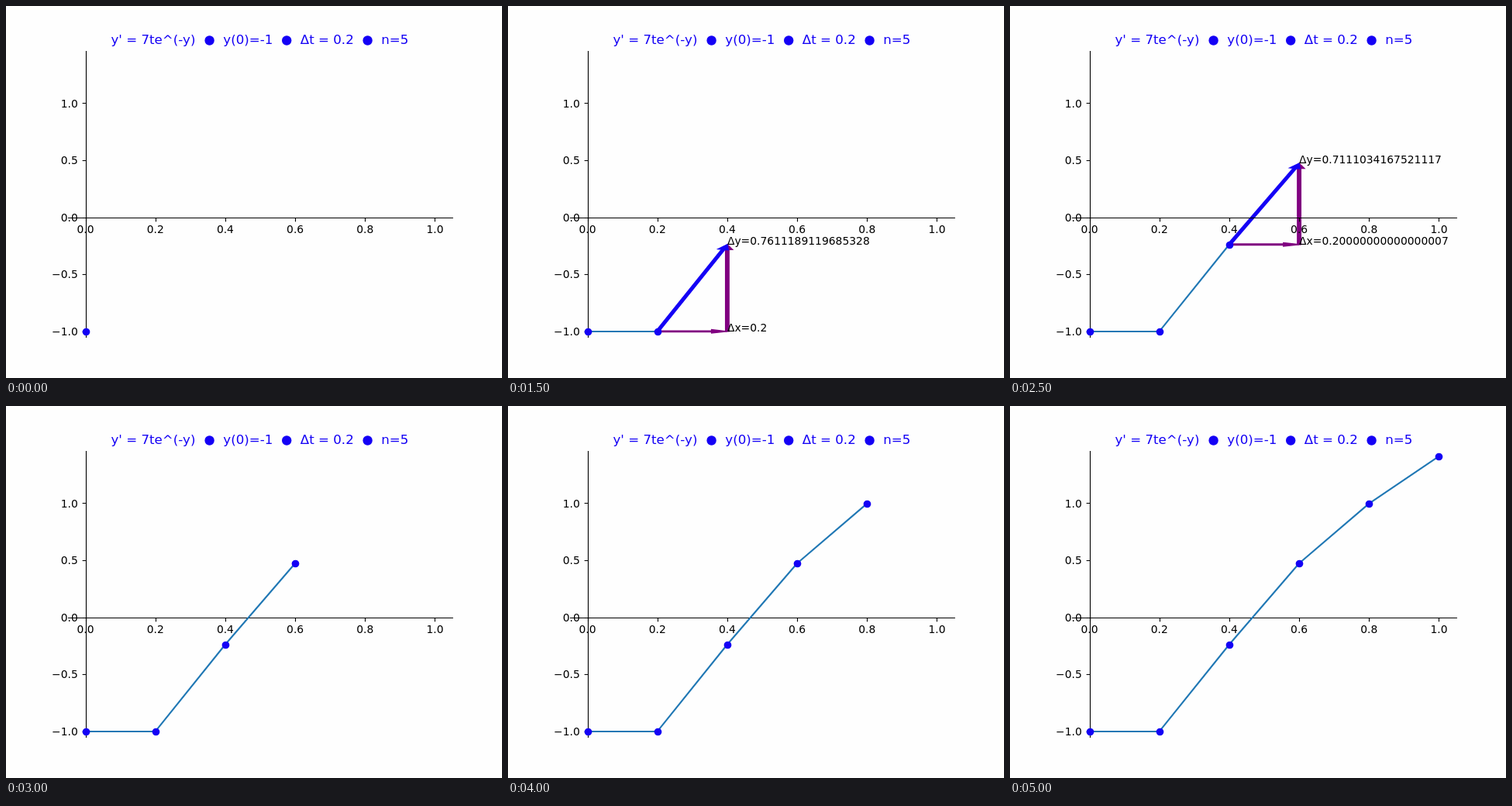
An HTML page with a canvas for the animation above (5.5 s loop, 640 by 480 pixels).

```html
<!DOCTYPE html>
<html>
<head>
<meta charset="utf-8">
<style>
html, body { margin: 0; width: 100%; height: 100%; overflow: hidden; background: #fefefe; }
canvas { display: block; }
</style>
</head>
<body>
<canvas id="stage" width="640" height="480"></canvas>
<script>
const ctx = document.getElementById('stage').getContext('2d');
const BLUE = '#1400f5', PURPLE = '#800080', TEAL = '#1f77b4';
const FONT = '"DejaVu Sans", sans-serif';
const STEP = 500, N = 5, DT = 0.2;
const BOX = { left: 80, right: 576, top: 57.6, bottom: 427.2 };

// Euler's method for y' = 7te^(-y), y(0) = -1
const pts = [{ t: 0, y: -1 }];
for (let i = 0; i < N; i++) {
  const { t, y } = pts[i];
  pts.push({ t: (i + 1) * DT, y: y + 7 * t * Math.exp(-y) * DT });
}

const kx = (BOX.right - BOX.left) / 1.1;
const ky = (BOX.bottom - BOX.top) / (pts[N].y + 1.1);
const px = t => BOX.left + (t + 0.05) * kx;
const py = y => BOX.bottom - (y + 1.05) * ky;
const snap = v => Math.round(v) + 0.5;

function line(x1, y1, x2, y2, color, width) {
  ctx.strokeStyle = color;
  ctx.lineWidth = width;
  ctx.beginPath();
  ctx.moveTo(x1, y1);
  ctx.lineTo(x2, y2);
  ctx.stroke();
}

function text(str, x, y, size = 13.889, align = 'left', color = '#000') {
  ctx.font = size + 'px ' + FONT;
  ctx.textAlign = align;
  ctx.fillStyle = color;
  ctx.fillText(str, x, y);
}

function disc(x, y, r) {
  ctx.fillStyle = BLUE;
  ctx.beginPath();
  ctx.arc(x, y, r, 0, Math.PI * 2);
  ctx.fill();
}

// Arrow outlined in data units, so its shape is skewed by the axis scales
function arrow(t, y, dt, dy, color) {
  const len = Math.hypot(dt, dy);
  if (!len) return;
  const ux = dt / len, uy = dy / len, neck = len - 0.045;
  const outline = [
    [0, 0.005], [neck, 0.005], [neck, 0.015], [len, 0],
    [neck, -0.015], [neck, -0.005], [0, -0.005]
  ];
  ctx.beginPath();
  for (const [a, b] of outline) {
    ctx.lineTo(px(t + a * ux - b * uy), py(y + a * uy + b * ux));
  }
  ctx.closePath();
  ctx.fillStyle = ctx.strokeStyle = color;
  ctx.lineWidth = 1.389;
  ctx.miterLimit = 4;
  ctx.fill();
  ctx.stroke();
}

function axes() {
  const x0 = snap(px(0)), y0 = snap(py(0));
  line(x0, 58, x0, 428, '#000', 1.11);
  line(80, y0, 577, y0, '#000', 1.11);
  for (let i = 0; i <= N; i++) {
    const x = px(i * DT);
    line(snap(x), y0, snap(x), y0 + 4.86, '#000', 1.11);
    text((i * DT).toFixed(1), x, 293, 13.889, 'center');
  }
  for (let v = -1; v <= 1; v += 0.5) {
    const y = py(v);
    line(x0 - 4.86, snap(y), x0, snap(y), '#000', 1.11);
    text(v.toFixed(1).replace('-', '\u2212'), 92.8, Math.round(y + 5.25), 13.889, 'right');
  }
}

function title() {
  const parts = [["y' = 7te^(-y)", 135.5], ['y(0)=-1', 280.3], ['Δt = 0.2', 379.8], ['n=5', 484.2]];
  for (const [str, x] of parts) text(str, x, 49, 16.667, 'left', BLUE);
  for (const x of [262.6, 362.2, 466.6]) disc(x, 44.5, 6.2);
}

const label = v => Number.isInteger(v) ? v.toFixed(1) : String(v);

function draw(phase) {
  const done = phase >> 1;
  const a = pts[done], b = pts[done + 1];
  const stepping = phase % 2 === 1;

  ctx.fillStyle = '#fefefe';
  ctx.fillRect(0, 0, 640, 480);

  if (stepping) {
    const dt = b.t - a.t, dy = b.y - a.y;
    arrow(a.t, a.y, dt, 0, PURPLE);
    arrow(b.t, a.y, 0, dy, PURPLE);
    arrow(a.t, a.y, dt, dy, BLUE);
  }

  axes();

  for (let i = 0; i < done; i++) {
    const p = pts[i], q = pts[i + 1];
    const flat = p.y === q.y;
    const y1 = flat ? Math.round(py(p.y)) : py(p.y);
    const y2 = flat ? y1 : py(q.y);
    line(px(p.t), y1, px(q.t), y2, TEAL, 2.083);
  }
  for (let i = 0; i <= done; i++) disc(snap(px(pts[i].t)), snap(py(pts[i].y)), 4.86);

  if (stepping) {
    const x = px(b.t);
    text('Δx=' + label(b.t - a.t), x, Math.round(py(a.y)));
    text('Δy=' + label(b.y - a.y), x, Math.round(py(b.y)));
  }
  title();
}

const start = performance.now();
function tick() {
  const time = Math.max(0, performance.now() - start);
  draw(Math.floor(time / STEP) % (2 * N + 1));
  requestAnimationFrame(tick);
}
tick();
</script>
</body>
</html>
```
